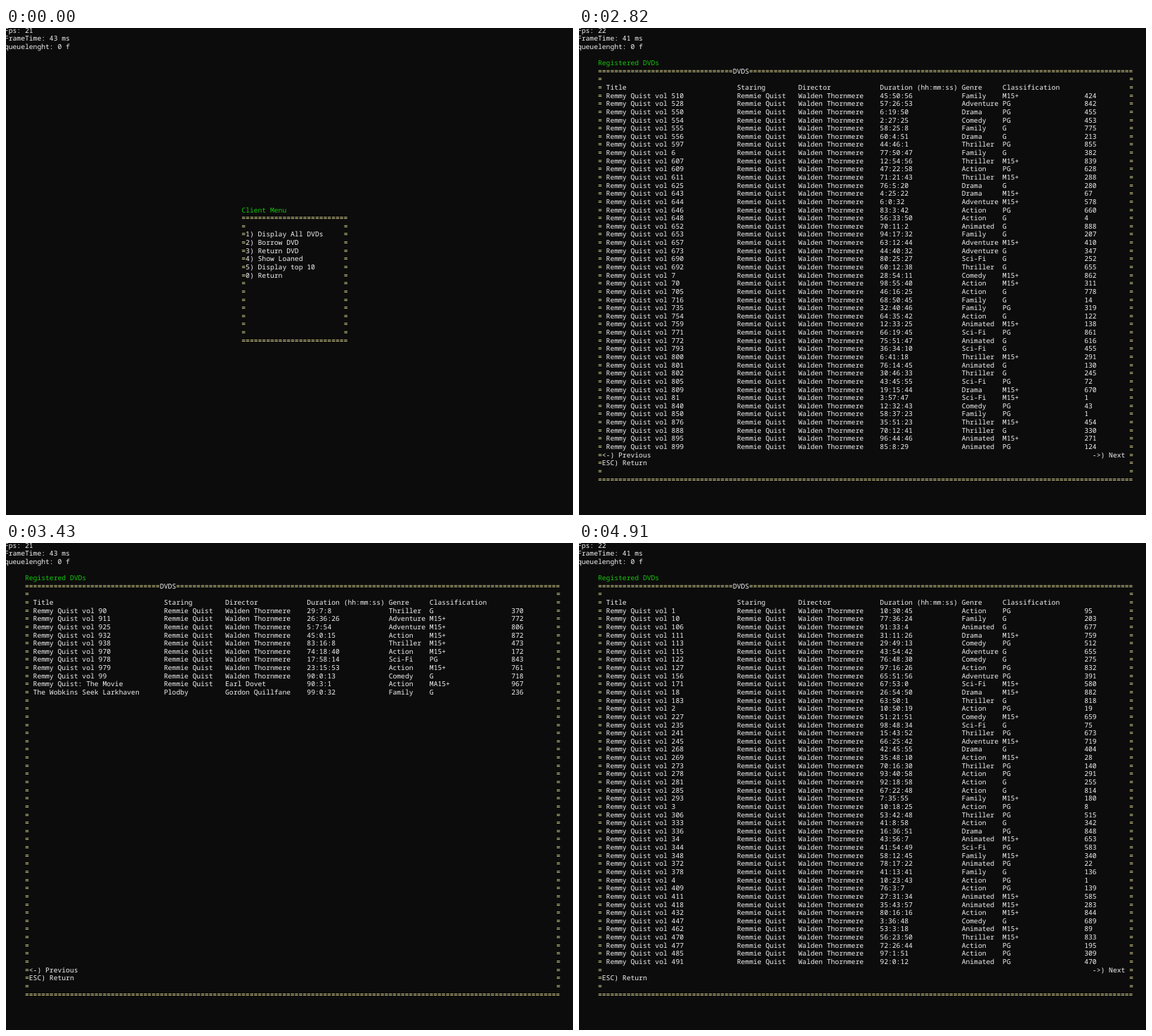
Animation of 807 by 694 pixels, one loop 5380 ms. Source, as an HTML page:

```html
<!DOCTYPE html>
<html lang="en">
<head>
<meta charset="utf-8">
<title>DVD library console</title>
<style>
  html, body { margin: 0; width: 100%; height: 100%; overflow: hidden; background: #0c0c0c; }
  svg { display: block; width: 100%; height: 100%; }
  text {
    font-family: "Noto Sans Mono", "DejaVu Sans Mono", monospace;
    font-size: 9.695px;
    text-rendering: geometricPrecision;
    white-space: pre;
  }
</style>
</head>
<body>
<svg id="stage" viewBox="0 0 807 694"></svg>
<script>
const LOOP = 5380;
const CELL_W = 5.817, CELL_H = 11.635, LEFT = -2.1, BASELINE = 6.6;
const WHITE = "#f2f2f2", GREEN = "#16c60c", YELLOW = "#f9f1a5";

const SERIES = "Remmy Quist", STAR = "Remmie Quist", DIRECTOR = "Walden Thornmere";
const COLUMNS = [7, 39, 54, 74, 94, 104, 124];
const HEADINGS = ["Title", "Staring", "Director", "Duration (hh:mm:ss)", "Genre", "Classification"];

// Volume, duration, genre, classification, quantity
const FIRST = `
1 10:30:45 Action PG 95
10 77:36:24 Family G 203
106 91:33:4 Animated G 677
111 31:11:26 Drama M15+ 759
113 29:49:13 Comedy PG 512
115 43:54:42 Adventure G 655
122 76:48:30 Comedy G 275
127 97:16:26 Action PG 832
156 65:51:56 Adventure PG 391
171 67:53:0 Sci-Fi M15+ 580
18 26:54:50 Drama M15+ 882
183 63:50:1 Thriller G 818
2 10:50:19 Action PG 19
227 51:21:51 Comedy M15+ 659
235 98:48:34 Sci-Fi G 75
241 15:43:52 Thriller PG 673
245 66:25:42 Adventure M15+ 719
268 42:45:55 Drama G 404
269 35:48:10 Action M15+ 28
273 70:16:30 Thriller PG 140
278 93:40:58 Action PG 291
281 92:18:58 Action G 255
285 67:22:48 Action G 814
293 7:35:55 Family M15+ 180
3 10:18:25 Action PG 8
306 53:42:48 Thriller PG 515
333 41:8:58 Action G 342
336 16:36:51 Drama PG 848
34 43:56:7 Animated M15+ 653
344 41:54:49 Sci-Fi PG 583
348 58:12:45 Family M15+ 340
372 78:17:22 Animated PG 22
378 41:13:41 Family G 136
4 10:23:43 Action PG 1
409 76:3:7 Action PG 139
411 27:31:34 Animated M15+ 585
418 35:43:57 Animated M15+ 283
432 80:16:16 Action M15+ 844
447 3:36:48 Comedy G 689
462 53:3:18 Animated M15+ 89
470 56:23:50 Thriller M15+ 833
477 72:26:44 Action PG 195
485 97:1:51 Action PG 309
491 92:0:12 Animated PG 470`;

const MIDDLE = `
510 45:50:56 Family M15+ 424
528 57:26:53 Adventure PG 842
550 6:19:50 Drama PG 455
554 2:27:25 Comedy PG 453
555 58:25:8 Family G 775
556 60:4:51 Drama G 213
597 44:46:1 Thriller PG 855
6 77:50:47 Family G 382
607 12:54:56 Thriller M15+ 839
609 47:22:58 Action PG 628
611 71:21:43 Thriller M15+ 288
625 76:5:20 Drama G 280
643 4:25:22 Drama M15+ 67
644 6:0:32 Adventure M15+ 578
646 83:3:42 Action PG 660
648 56:33:50 Action G 4
652 70:11:2 Animated G 888
653 94:17:32 Family G 207
657 63:12:44 Adventure M15+ 410
673 44:40:32 Adventure G 347
690 80:25:27 Sci-Fi G 252
692 60:12:38 Thriller G 655
7 28:54:11 Comedy M15+ 862
70 98:55:40 Action M15+ 311
705 46:16:25 Action G 778
716 68:50:45 Family G 14
735 32:40:46 Family PG 319
754 64:35:42 Action G 122
759 12:33:25 Animated M15+ 138
771 66:19:45 Sci-Fi PG 861
772 75:51:47 Animated G 616
793 36:34:10 Sci-Fi G 455
800 6:41:18 Thriller M15+ 291
801 76:14:45 Animated G 130
802 30:46:33 Thriller G 245
805 43:45:55 Sci-Fi PG 72
809 19:15:44 Drama M15+ 670
81 3:57:47 Sci-Fi M15+ 1
840 12:32:43 Comedy PG 43
850 58:37:23 Family PG 1
876 35:51:23 Thriller M15+ 454
888 70:12:41 Thriller G 330
895 96:44:46 Animated M15+ 271
899 85:8:29 Animated PG 124`;

const LAST = `
90 29:7:8 Thriller G 370
911 26:36:26 Adventure M15+ 772
925 5:7:54 Adventure M15+ 806
932 45:0:15 Action M15+ 872
938 83:16:8 Thriller M15+ 473
970 74:18:40 Action M15+ 172
978 17:58:14 Sci-Fi PG 843
979 23:15:53 Action M15+ 761
99 90:0:13 Comedy G 718`;

const EXTRAS = [
  [SERIES + ": The Movie", STAR, "Earl Dovet", "90:3:1", "Action", "MA15+", "967"],
  ["The Wobkins Seek Larkhaven", "Plodby", "Gordon Quillfane", "99:0:32", "Family", "G", "236"],
];

const stage = document.getElementById("stage");

function add(parent, tag, attrs = {}) {
  const node = document.createElementNS("http://www.w3.org/2000/svg", tag);
  for (const key in attrs) node.setAttribute(key, attrs[key]);
  return parent.appendChild(node);
}

function print(parent, col, row, string, fill = WHITE) {
  const x = LEFT + col * CELL_W, y = BASELINE + row * CELL_H;
  const node = add(parent, "text", { x, y, fill });
  node.textContent = string;
  return node;
}

function box(parent, col, row, width, height) {
  const border = "=".repeat(width);
  print(parent, col, row, border, YELLOW);
  for (let r = row + 1; r < row + height - 1; r++) {
    print(parent, col, r, "=", YELLOW);
    print(parent, col + width - 1, r, "=", YELLOW);
  }
  print(parent, col, row + height - 1, border, YELLOW);
}

function parseRows(list) {
  return list.trim().split("\n").map(line => {
    const [volume, ...details] = line.split(" ");
    return [`${SERIES} vol ${volume}`, STAR, DIRECTOR, ...details];
  });
}

function buildMenu() {
  const group = add(stage, "g");
  print(group, 58, 22, "Client Menu", GREEN);
  box(group, 58, 23, 26, 16);
  ["1) Display All DVDs", "2) Borrow DVD", "3) Return DVD", "4) Show Loaned", "5) Display top 10", "0) Return"]
    .forEach((item, i) => print(group, 59, 25 + i, item));
  return group;
}

function buildTable() {
  const group = add(stage, "g");
  print(group, 5, 4, "Registered DVDs", GREEN);
  box(group, 5, 5, 131, 51);
  // Clear the border behind its caption.
  add(group, "rect", {
    x: LEFT + 38 * CELL_W, y: 5 * CELL_H - 2, width: 4 * CELL_W, height: CELL_H, fill: "#0c0c0c",
  });
  print(group, 38, 5, "DVDS");
  HEADINGS.forEach((heading, i) => print(group, COLUMNS[i], 7, heading));
  print(group, 6, 53, "ESC) Return");
  return group;
}

function buildPage(rows, hasPrevious, hasNext) {
  const group = add(stage, "g");
  rows.forEach((row, r) => row.forEach((cell, c) => print(group, COLUMNS[c], 8 + r, cell)));
  if (hasPrevious) print(group, 6, 52, "<-) Previous");
  if (hasNext) print(group, 126, 52, "->) Next");
  return group;
}

const fps = print(stage, 0, 0, "");
const frameTime = print(stage, 0, 1, "");
print(stage, 0, 2, "queuelenght: 0 f");
const menu = buildMenu();
const table = buildTable();
const quantity = print(stage, COLUMNS[6], 7, "Quantity");
const pages = [
  buildPage(parseRows(FIRST), false, true),
  buildPage(parseRows(MIDDLE), true, true),
  buildPage([...parseRows(LAST), ...EXTRAS], true, false),
];

const show = (node, on) => node.setAttribute("visibility", on ? "visible" : "hidden");

function pageAt(t) {
  if (t < 1620) return -1;
  if (t < 2820) return 0;
  if (t < 3430) return 1;
  if (t < 4350) return 2;
  return t < 4910 ? 1 : 0;
}

function render(t) {
  const page = pageAt(t);
  const slow = t < 1020 || (t >= 2960 && t < 3980);
  fps.textContent = `Fps: ${slow ? 21 : 22}`;
  frameTime.textContent = `FrameTime: ${slow ? 43 : 41} ms`;
  show(menu, page < 0);
  show(table, page >= 0);
  show(quantity, t >= 1620 && t < 2820);
  pages.forEach((group, i) => show(group, i === page));
}

const start = performance.now();
function tick() {
  render((performance.now() - start) % LOOP);
  requestAnimationFrame(tick);
}
tick();
</script>
</body>
</html>
```
